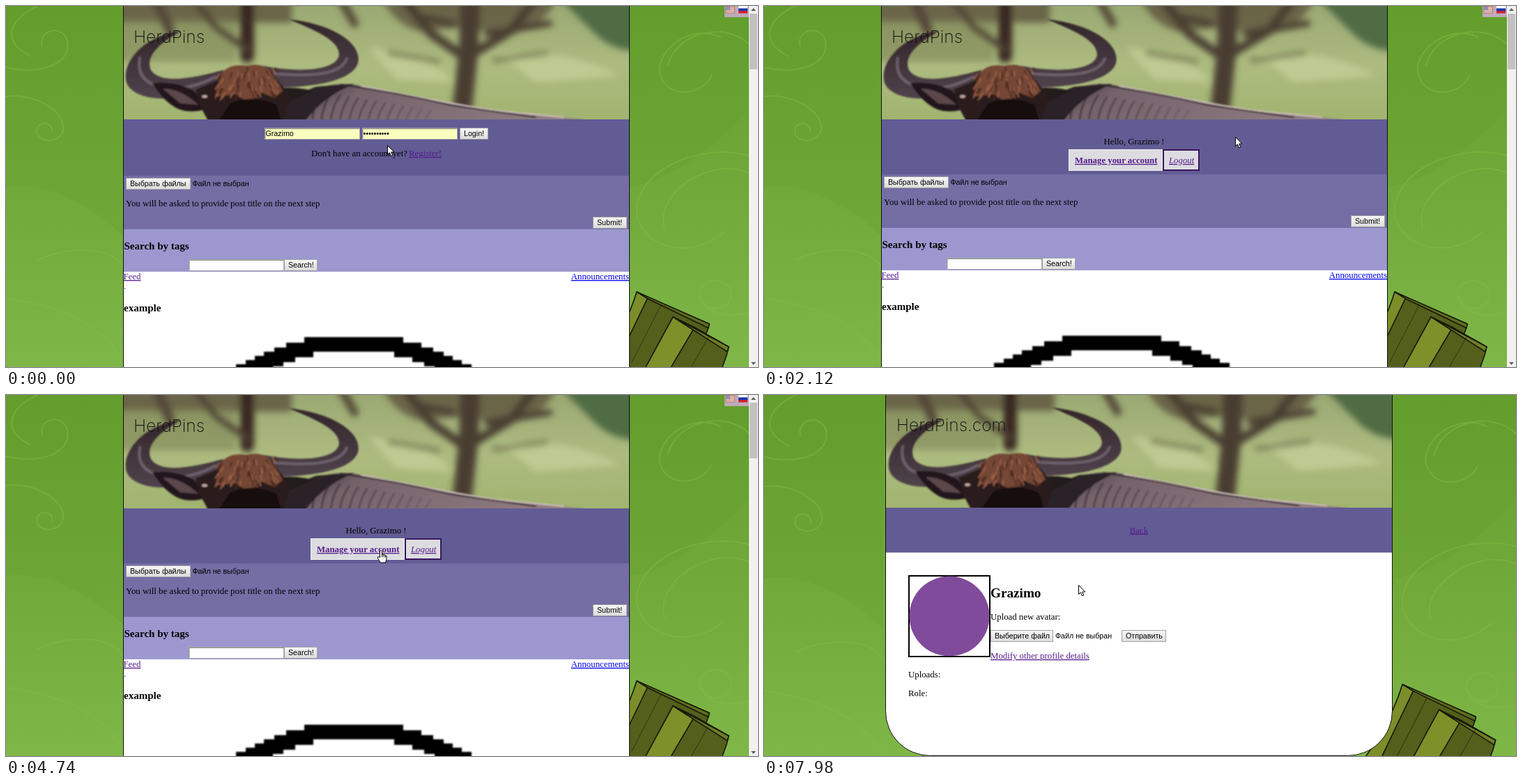
Write an HTML page that moves like this. It is 1079 by 519 pixels and loops after 8000 ms.

```html
<!DOCTYPE html>
<html lang="en">
<head>
<meta charset="utf-8">
<title>HerdPins</title>
<style>
html, body { margin: 0; width: 100%; height: 100%; overflow: hidden; background: #70a838 }
svg { display: block }
text { font: 12.8px "Liberation Serif", serif; white-space: pre }
.ui { font: 10.67px "Liberation Sans", sans-serif }
.b { font-weight: bold }
.h3 { font-weight: bold; font-size: 15px }
.h2 { font-weight: bold; font-size: 19.2px }
.link { fill: #00e; text-decoration: underline }
.seen { fill: #551a8b; text-decoration: underline }
.title { font: 200 24.5px Inter, Lato, sans-serif; fill: #111 }
.status { font: 8.7px "Open Sans", "Noto Sans", sans-serif; fill: #777 }
</style>
</head>
<body>
<svg id="stage" width="1079" height="519" viewBox="0 0 1079 519"></svg>
<script>
const SITE = 'HerdPins', HOST = 'herdpins.rf.gd', USER = 'Grazimo';
const $ = id => document.getElementById(id);

const text = (x, y, s, cls = '', more = '') => `<text x="${x}" y="${y}" class="${cls}" ${more}>${s}</text>`;
const rect = (x, y, w, h, fill, more = '') =>
  `<rect x="${x}" y="${y}" width="${w}" height="${h}" fill="${fill}" ${more}/>`;
const path = (d, fill, more = '') => `<path d="${d}" fill="${fill}" ${more}/>`;
const line = (d, color, w = 1, more = '') => path(d, 'none', `stroke="${color}" stroke-width="${w}" stroke-linecap="round" ${more}`);
const button = (x, y, w, s) =>
  rect(x + .5, y + .5, w - 1, 16, 'url(#btn)', 'stroke="#a2a2a2"') + text(x + 6, y + 12, s, 'ui');
const field = (x, y, w, fill, s = '') =>
  rect(x + .5, y + .5, w - 1, 16, fill, 'stroke="#aaa"') +
  line(`M${x + 1} ${y + 15}V${y + 1.5}H${x + w - 1}`, '#8a8a86') + text(x + 1.5, y + 12, s, 'ui');

let seed = 7;
const random = () => (seed = seed * 16807 % 2147483647) / 2147483647;

const defs = `<defs>
  <linearGradient id="btn" x2="0" y2="1"><stop stop-color="#f7f7f7"/><stop offset="1" stop-color="#dcdcdc"/></linearGradient>
  <linearGradient id="green" x2="0" y2="1">
    <stop stop-color="#659f2e"/><stop offset=".55" stop-color="#72aa3b"/><stop offset="1" stop-color="#80b749"/></linearGradient>
  <linearGradient id="meadow" x2="0" y2="1">
    <stop stop-color="#98a672"/><stop offset=".5" stop-color="#adbb80"/><stop offset="1" stop-color="#9fb26c"/></linearGradient>
  <linearGradient id="horn" x2="0" y2="1"><stop stop-color="#33262a"/><stop offset="1" stop-color="#50434c"/></linearGradient>
  <linearGradient id="hide" x2="1" y2=".25">
    <stop stop-color="#33282d"/><stop offset=".3" stop-color="#75626a"/><stop offset="1" stop-color="#8f7b82"/></linearGradient>
  <filter id="far" x="-20%" y="-20%" width="140%" height="140%"><feGaussianBlur stdDeviation="5"/></filter>
  <filter id="near"><feGaussianBlur stdDeviation=".8"/></filter>
  <g id="photo">${photo()}</g>
</defs>`;

function photo() {
  const bark = '#4a3d32';
  const tufts = Array.from({length: 70}, () => {
    const x = 305 + random() * 85, y = 88 + random() * 40;
    return line(`M${x} ${y}l${(x - 347) / 9} 7`, random() < .5 ? '#a0664a' : '#4a281f', 1.6);
  }).join('');
  const stripes = Array.from({length: 14}, (_, i) =>
    line(`M${440 + i * 13} ${122 + i * 2.2}q-14 20-14 50`, '#2d2328', 3, `opacity="${.6 - i * .035}"`)).join('');
  return rect(150, -10, 760, 190, 'url(#meadow)') +
    `<g filter="url(#far)">
      ${rect(150, -10, 260, 34, '#6b6549')}${rect(150, 20, 180, 60, '#7f8558', 'opacity=".6"')}
      ${path('M540-10H790Q770 35 715 42 660 25 600 38 560 30 540-10Z', '#62583f', 'opacity=".85"')}
      ${path('M795-10H910V65Q870 65 845 40T795-10', '#4f6c45')}
      ${path('M520 60Q620 75 640 110L560 105ZM710 70Q800 60 880 100L760 110Z', '#bfca93')}
      ${line('M346-10V72', '#382820', 20)}${line('M215-10 235 35', '#55463a', 15)}
      ${line('M270-10 300 30 345 62', '#4f4335', 9)}${line('M480-10 500 25', '#554b38', 12)}
      ${line('M666-5 664 60 655 145', bark, 28)}
      ${line('M660 75 610 40 575-5M668 70 725 35 760-10', bark, 13)}
      ${line('M640 25 590 15M690 40 780 25', bark, 9)}${line('M620 80 550 68M700 78 775 68', '#7c8057', 7)}
    </g><g filter="url(#near)">
      ${path('M385 170Q400 135 430 124 475 106 510 115 590 131 640 141 740 156 830 163V175H385Z', 'url(#hide)')}
      ${stripes}
      ${path('M390 165 405 132 445 116 500 112Q455 130 430 165Z', '#2b2125')}
      ${line('M510 115Q620 137 700 150L800 160', '#d0bfbd', 2)}
      ${line('M480 113Q560 124 640 143L760 160', '#2f252a', 2)}
      ${path('M251 36C200 42 168 78 172 106 176 136 240 143 305 118L312 92C272 103 222 114 208 92 199 72 222 52 251 36Z', 'url(#horn)')}
      ${path('M406 19C465 25 512 52 505 82 497 108 440 118 378 117L368 86C425 97 475 92 478 70 478 48 440 34 406 19Z', 'url(#horn)')}
      ${line('M192 75Q186 108 222 116T300 102', '#7d6f7e', 4, 'opacity=".7"')}
      ${line('M385 97Q478 106 489 76', '#7d6f7e', 4, 'opacity=".7"')}
      ${path('M210 111Q245 107 270 122L290 147Q265 156 245 147 225 136 210 111Z', '#21171a')}
      ${path('M225 119Q250 118 276 142L250 140Z', '#5b464c')}
      ${path('M388 118Q420 116 440 122L405 138Z', '#241a1d')}
      ${path('M272 120 320 100H385L408 130 398 165H290L278 143Z', '#2a1b1b')}
      ${path('M300 130 308 98Q320 82 345 86 370 80 384 98L397 122 385 132 365 124 350 140 330 127Z', '#744635')}
      ${tufts}
      ${path('M305 165 322 140Q355 126 388 142L395 165Z', '#170e10')}
      <ellipse cx="285" cy="130" rx="4" ry="2" fill="#c0a8a0"/>
    </g>`;
}

function backdrop() {
  const swirls = `M0 88C45 100 95 85 88 50 80 25 45 35 52 58M45 0C5 18-8 50 35 72M0 130C40 125 85 150 82 178 78 198 45 198 44 180 45 164 68 166 66 181
    M45 365C90 345 150 345 168 375M0 420C60 430 130 445 168 510
    M1025 45C985 25 935 60 938 95 945 135 1000 130 1012 100M1066 55C1030 20 960 40 950 85
    M1066 215C990 195 900 240 905 300 915 350 985 365 1030 325M1066 240C1010 215 930 270 945 320
    M995 415a23 20 0 1 0 46 0a23 20 0 1 0-46 0M1066 440Q1010 455 995 415`;
  return rect(0, 0, 1080, 530, 'url(#green)') +
    path('M0 0H168V330Q80 250 0 260ZM894 0H1066V150Q970 250 894 260Z', '#5b962a', 'opacity=".16"') +
    line(swirls, '#85bd43', 2, 'opacity=".45"') +
    `<g stroke="#15180a" stroke-width="1.6" stroke-linejoin="round">
      ${path('M921 419 1009 457 1006 468 975 530H860Z', '#545f1b')}
      ${path('M905 411 921 419 868 530H840Q885 475 905 411Z', '#7b8e29')}
      ${path('M905 411 1009 457 1008 463 921 421Z', '#616d1d')}
      ${path('M988 462 1037 490 1034 502 1024 530H945Z', '#545f1b')}
      ${path('M957 447 988 462 948 530H912Z', '#7d902a')}
      ${path('M957 447 1037 490 1035 497 988 467Z', '#6f7e24')}
      ${line('M940 430 898 512M1008 476 980 525', '#15180a', 1, 'opacity=".6"')}
    </g>`;
}

function arc() {
  const steps = [[428, 476], [402, 484], [385, 491], [370, 497], [357, 503], [344, 509], [330, 515]];
  const blocks = steps.map(([x, y], i) => {
    const w = i ? steps[i - 1][0] - x + 13 : 75;
    return rect(x, y, w, 21, '#000') + rect(998 - x - w, y, w, 21, '#000');
  });
  return `<g id="arc" filter="url(#near)">${blocks.join('')}</g>`;
}

const flags = rect(1031, 0, 35, 16, '#bfaabb') +
  rect(1032.5, .5, 13, 9.5, '#e8c9b8', 'stroke="#b07a70"') +
  line('M1033 2.5H1045M1033 5H1045M1033 7.5H1045', '#d08d80') + rect(1033, 1, 6, 5, '#8d91b5') +
  rect(1051, 0, 13, 3.5, '#fff') + rect(1051, 3.5, 13, 3.5, '#1238b0') + rect(1051, 7, 13, 3.5, '#d0202a');

const scrollbar = rect(1066, 0, 13, 519, '#f1f1f1') + rect(1067, 11, 11, 80, '#c1c1c1') +
  path('M1069 7h7l-3.5-4zM1069 512h7l-3.5 4z', '#606060');

const loginForm = field(371, 175, 137, '#faffbd', USER) + field(511, 175, 137, '#faffbd', '•'.repeat(10)) +
  button(651, 175, 41, 'Login!') + rect(652, 176, 39, 15, '#000', 'id="press" opacity=".1"') +
  text(438, 216, 'Don\'t have an account yet?') + text(578, 216, 'Register!', 'seen');

const welcome = text(531, 199, `Hello, ${USER} !`, '', 'text-anchor="middle"') +
  rect(437.5, 206.5, 134, 30, '#dcdce0', 'stroke="#f0f0f0"') + text(446, 226, 'Manage your account', 'seen b') +
  rect(573, 207, 51, 29, '#dcdce0', 'stroke="#3a1560" stroke-width="2"') +
  text(581, 226, 'Logout', 'seen', 'style="font-style:italic"');

const feed = `<g id="feed">` + rect(169, 244, 725, 77, '#746ea5') + rect(169, 321, 725, 61, '#9c98cf') +
  rect(169, 382, 725, 150, '#fff') +
  button(172, 247, 93, 'Выбрать файлы') + text(267.5, 259, 'Файл не выбран', 'ui') +
  text(172, 288, 'You will be asked to provide post title on the next step') + button(842, 303, 49, 'Submit!') +
  text(169.5, 350, 'Search by tags', 'h3') + field(262, 364, 137, '#fff') + button(399, 364, 48, 'Search!') +
  text(168.5, 393, 'Feed', 'seen') + text(894, 393, 'Announcements', 'link', 'text-anchor="end"') +
  text(169, 407, '.', '', 'fill="#551a8b"') + text(169, 439, 'example', 'h3') + arc() + `</g>`;

const home = `<g id="home">
  ${rect(169, 0, 725, 519, '#fff')}
  <svg id="banner" x="169" width="725" height="163" viewBox="169 0 725 163"><use href="#photo"/>${text(183, 53, SITE, 'title')}</svg>
  ${rect(169, 163, 725, 90, '#625c94')}
  <g id="login">${loginForm}</g><g id="welcome">${welcome}</g>
  ${feed}${path('M168.5 0V519M894.5 0V519', 'none', 'stroke="#111"')}${flags}${scrollbar}</g>`;

const profile = `<g id="profile">
  ${path('M174.5-5V454.5a64 64 0 0 0 64 64H837.5a64 64 0 0 0 64-64V-5Z', '#fff', 'stroke="#111"')}
  <svg x="175" width="726" height="162" viewBox="168 1 726 162"><use href="#photo"/></svg>
  ${text(190, 52, SITE + '.com', 'title')}
  ${rect(175, 162, 726, 64.5, '#625c94')}${text(538, 198.5, 'Back', 'seen', 'text-anchor="middle"')}
  ${rect(208, 260, 116, 116, '#fff', 'stroke="#000" stroke-width="2"')}<circle cx="266" cy="318" r="57.5" fill="#814b9b"/>
  ${text(325, 291, USER, 'h2')}${text(325, 323, 'Upload new avatar:')}
  ${button(325, 338, 90, 'Выберите файл')}${text(418, 350, 'Файл не выбран', 'ui')}${button(513, 338, 64, 'Отправить')}
  ${text(325, 379, 'Modify other profile details', 'seen')}
  ${text(207, 406, 'Uploads:')}${text(207, 433, 'Role:')}</g>`;

const overlay = `<g id="status">${rect(-2, 504.5, 358, 18, '#f3f3f3', 'stroke="#c4c4c4"')}
  ${text(-1, 516.5, '', 'status', 'id="note"')}</g>
  <g id="cursor" stroke="#000" stroke-linejoin="round">
    ${path('M.5.5V13.5L3.5 10.8 5.6 15.8 7.8 14.9 5.7 10H9.8Z', '#fff', 'id="arrow"')}
    ${path('M-1.5 10.5V1.4Q0-.5 1.5 1.4V6.2Q3.2 5.4 4 6.9 5.7 6.2 6.2 7.7 8 7.2 8 9.2V13L6.5 18H-.8L-4.6 11.6Q-4.9 9.2-3 9.6ZM1.5 6V10M4 7V10.2M6.2 8V10.5', '#fff', 'id="hand"')}
  </g>`;

$('stage').innerHTML = defs + `<g id="back">${backdrop()}</g>` + home + profile + overlay;

const show = (id, on) => $(id).setAttribute('display', on ? 'inline' : 'none');
const ease = p => p * p * (3 - 2 * p);
const linear = p => p;

// Pointer legs: start, end, target x, target y, easing
const legs = [[240, 900, 676, 188, ease], [2100, 2900, 541, 217, ease], [2920, 3100, 538, 223, ease], [6780, 7980, 451, 273, linear]];
function pointer(t) {
  let x = 546.5, y = 199.5;
  for (const [from, to, tx, ty, f] of legs) {
    const p = f(Math.min(1, Math.max(0, (t - from) / (to - from))));
    x += (tx - x) * p;
    y += (ty - y) * p;
  }
  return [Math.round(x), Math.round(y)];
}

const waiting = `Ожидание ${HOST}...`;
const notes = [[0, ''], [2800, `${HOST}/account.php`], [3100, 'Ожидание ответа сайта...'], [3540, waiting],
  [3780, `Передача данных с сайта ${HOST}...`], [4020, waiting], [4740, ''], [6540, waiting], [6800, '']];

function draw(now) {
  const t = now % 8000, onProfile = t >= 6320, signedIn = t >= 1700, loading = signedIn && t < 1760;
  show('home', !onProfile);
  show('profile', onProfile);
  show('login', !signedIn);
  show('welcome', signedIn);
  show('press', t >= 1200 && t < 1320);
  show('banner', !loading);
  show('arc', !loading);
  $('feed').setAttribute('transform', `translate(0 ${signedIn ? -2 : 0})`);
  $('back').setAttribute('transform', `scale(${onProfile ? 1079 / 1066 : 1})`);

  const note = notes.filter(n => t >= n[0]).pop()[1];
  show('status', note);
  $('note').textContent = note;
  $('status').setAttribute('opacity', t > 4560 && t < 4740 ? 1 - (t - 4560) / 180 : 1);

  const hand = t >= 2800 && t < 3100 || t >= 4560 && t < 6800;
  show('hand', hand);
  show('arrow', !hand);
  $('cursor').setAttribute('transform', `translate(${pointer(t)})`);
}

const start = performance.now();
function tick() {
  draw(performance.now() - start);
  requestAnimationFrame(tick);
}
tick();
</script>
</body>
</html>
```
